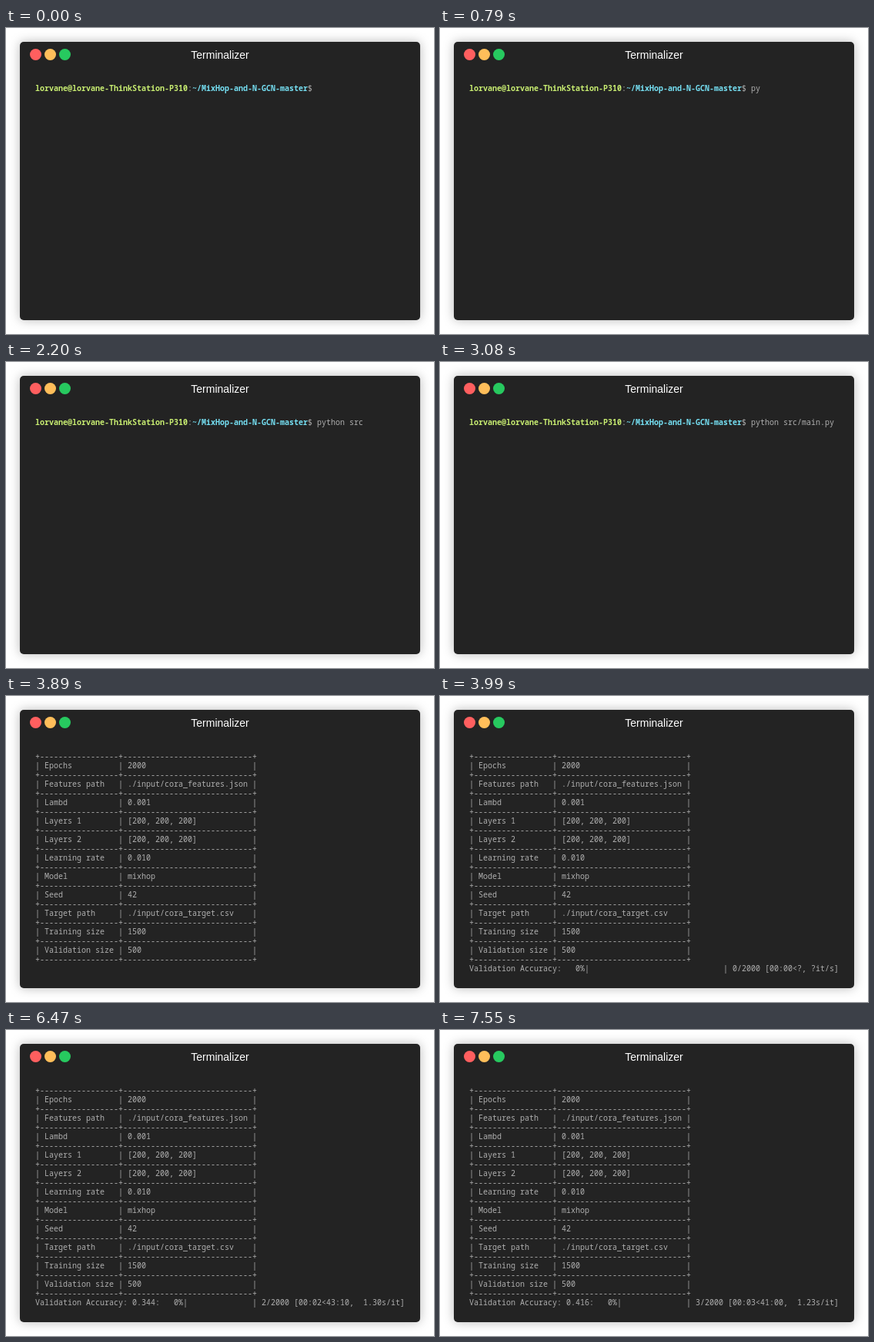
These frames come from a looping animation (556x398 px, 8 s). An HTML page:

```html
<!DOCTYPE html>
<html lang="en">
<head>
<meta charset="utf-8">
<title>Terminal</title>
<style>
  html, body { margin: 0; width: 100%; height: 100%; overflow: hidden; background: #fff; }
  svg { display: block; width: 556px; height: 398px; }
  .window { fill: #232323; filter: drop-shadow(0 0 7px rgba(0, 0, 0, .28)); }
  .title { font: 14px "Liberation Sans", Arial, sans-serif; fill: #fff; text-anchor: middle; }
  .screen { font: 10px "Noto Sans Mono", "DejaVu Sans Mono", monospace; fill: #afafaf; }
  .screen text { white-space: pre; font-variant-ligatures: none; }
  .bold { font-weight: 700; }
  .user { fill: #c8ed71; }
  .path { fill: #75dff2; }
</style>
</head>
<body>
<svg viewBox="0 0 556 398" xmlns="http://www.w3.org/2000/svg">
  <rect class="window" x="18" y="18" width="520" height="362" rx="5"/>
  <circle cx="38.5" cy="34.5" r="7.5" fill="#ff5f5f"/>
  <circle cx="57.5" cy="34.5" r="7.5" fill="#ffbe5a"/>
  <circle cx="76.5" cy="34.5" r="7.5" fill="#27c95f"/>
  <text class="title" x="278" y="40">Terminalizer</text>
  <g class="screen">
    <g id="shell"></g>
    <g id="table"></g>
    <g id="progress"></g>
  </g>
</svg>
<script>
const LOOP = 8000, LEFT = 38, BASELINE = 82, CELL = 6, LINE = 12, COLS = 80;
const RUN_AT = 3890;

const $ = id => document.getElementById(id);

function addText(parent, col, row, className = "") {
  const el = document.createElementNS("http://www.w3.org/2000/svg", "text");
  el.setAttribute("x", LEFT + col * CELL);
  el.setAttribute("y", BASELINE + row * LINE);
  el.setAttribute("class", className);
  parent.append(el);
  return el;
}

// Shell prompt, followed by the command being typed
let col = 0;
for (const [text, className] of [
  ["lorvane@lorvane-ThinkStation-P310", "bold user"],
  [":", ""],
  ["~/MixHop-and-N-GCN-master", "bold path"],
  ["$", ""]
]) {
  addText($("shell"), col, 0, className).textContent = text;
  col += text.length;
}
const command = addText($("shell"), col + 1, 0);

// Settings table
const settings = [
  ["Epochs", "2000"],
  ["Features path", "./input/cora_features.json"],
  ["Lambd", "0.001"],
  ["Layers 1", "[200, 200, 200]"],
  ["Layers 2", "[200, 200, 200]"],
  ["Learning rate", "0.010"],
  ["Model", "mixhop"],
  ["Seed", "42"],
  ["Target path", "./input/cora_target.csv"],
  ["Training size", "1500"],
  ["Validation size", "500"]
];
const rule = `+${"-".repeat(17)}+${"-".repeat(28)}+`;
const lines = [rule];
for (const [key, value] of settings) {
  lines.push(`| ${key.padEnd(15)} | ${value.padEnd(26)} |`, rule);
}
lines.forEach((line, row) => addText($("table"), 0, row).textContent = line);

const progress = addText($("progress"), 0, lines.length);

function bar(label, stats) {
  const head = `${label}:   0%|`, tail = `| ${stats}`;
  return head + " ".repeat(COLS - head.length - tail.length) + tail;
}

// [start in ms, content]
const typing = [
  [0, ""], [500, "p"], [790, "py"], [1010, "pyt"], [1190, "pyth"],
  [1410, "pytho"], [1640, "python"], [1950, "python s"], [2100, "python sr"],
  [2200, "python src"], [2480, "python src/"], [2750, "python src/m"],
  [2870, "python src/ma"], [3080, "python src/main.py"]
];
const training = [
  [0, ""],
  [3990, bar("Validation Accuracy", "0/2000 [00:00<?, ?it/s]")],
  [5370, bar("Validation Accuracy: 0.278", "1/2000 [00:01<45:58,  1.38s/it]")],
  [6470, bar("Validation Accuracy: 0.344", "2/2000 [00:02<43:10,  1.30s/it]")],
  [7550, bar("Validation Accuracy: 0.416", "3/2000 [00:03<41:00,  1.23s/it]")]
];

const at = (steps, t) => steps.findLast(([start]) => start <= t)[1];
const show = (el, on) => el.setAttribute("visibility", on ? "visible" : "hidden");
const setText = (el, text) => { if (el.textContent !== text) el.textContent = text; };

function render(t) {
  show($("shell"), t < RUN_AT);
  show($("table"), t >= RUN_AT);
  setText(command, at(typing, t));
  setText(progress, at(training, t));
}

const begin = performance.now();
function tick() {
  render((performance.now() - begin) % LOOP);
  requestAnimationFrame(tick);
}
render(0);
requestAnimationFrame(tick);
</script>
</body>
</html>
```
